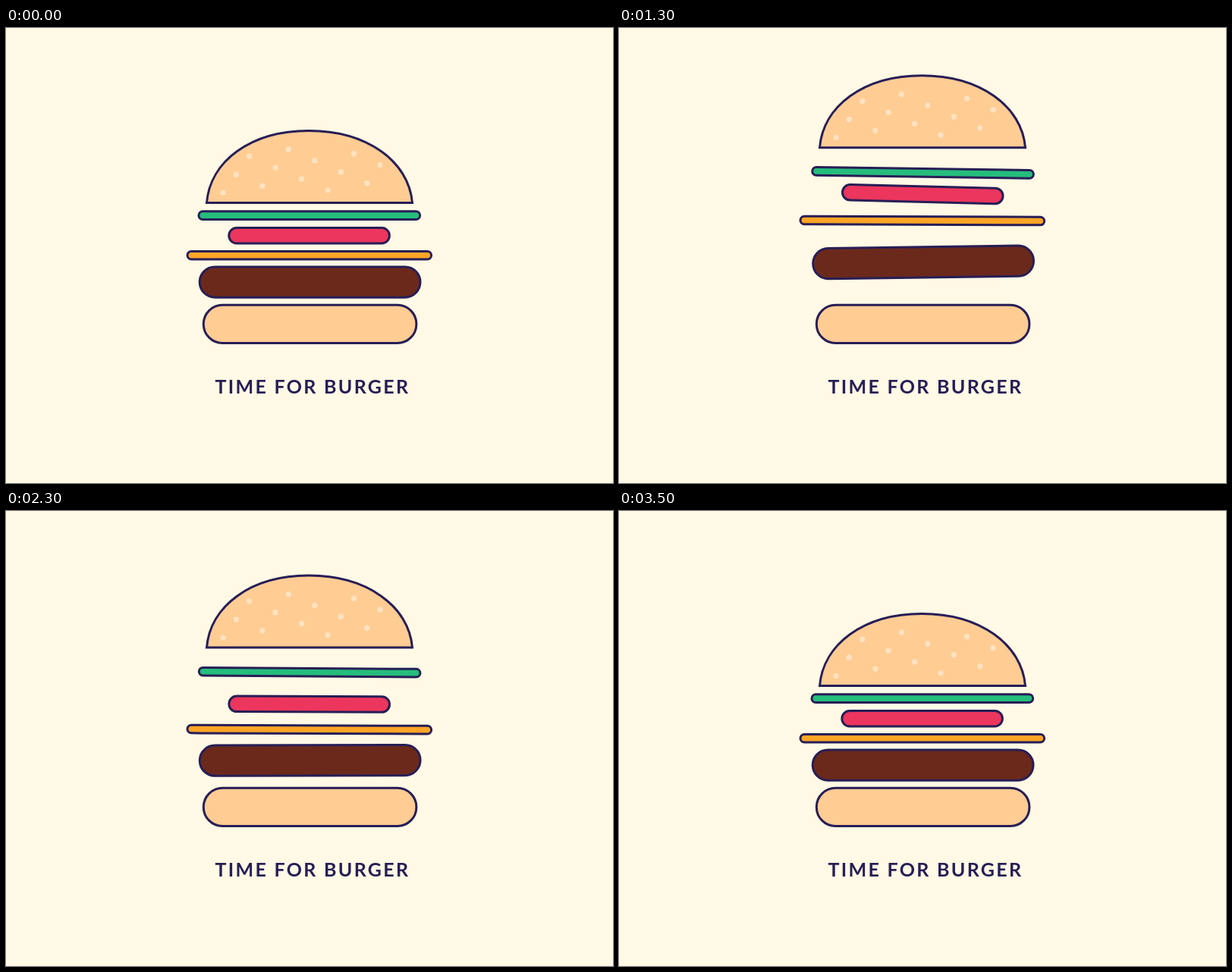
An HTML page for the animation above (4 s loop, 800 by 600 pixels).

```html
<!DOCTYPE html>
<html lang="en">
<head>
<meta charset="utf-8">
<title>Time for burger</title>
<style>
  html, body { margin: 0; width: 100%; height: 100%; overflow: hidden; background: #fff9e5; }
  svg { display: block; width: 800px; height: 600px; }
  .shape { stroke: #271e56; stroke-width: 3; }
  text { font: 700 25px Lato, "Open Sans", sans-serif; letter-spacing: 2.3px; fill: #271e56; }
</style>
</head>
<body>
<svg viewBox="0 0 800 600">
  <g class="shape">
    <rect x="260.3" y="365.3" width="280.6" height="50.2" rx="25.1" fill="#ffcc94"/>
    <rect id="patty" x="255.2" y="315" width="290.8" height="40.2" rx="20.1" fill="#6b291b"/>
    <rect id="cheese" x="239" y="294.4" width="321.6" height="10.6" rx="5.3" fill="#ffa526"/>
    <rect id="tomato" x="293.8" y="263.5" width="211.6" height="20.5" rx="10.2" fill="#ec365e"/>
    <rect id="lettuce" x="254" y="241.8" width="291.6" height="10.7" rx="5.3" fill="#25bd7c"/>
  </g>
  <g id="bun">
    <path class="shape" fill="#ffcc94" d="M264.5 230.5C269 176 322 135.5 399 135.5S531 176 535.5 230.5Z"/>
    <g id="seeds" fill="#ffe2c0"></g>
  </g>
  <text x="275.5" y="482">TIME FOR BURGER</text>
</svg>
<script>
const LOOP = 4000, STEP = 100, PEAK = 1500, BEAT = 500;
const $ = id => document.getElementById(id);

// Seeds: even columns, heights spread by the golden ratio
for (let i = 0; i < 13; i++) {
  const x = 286 + 17.25 * i, y = 155 + 63 * ((0.99 + 0.618 * i) % 1);
  $('seeds').innerHTML += `<circle cx="${x}" cy="${y}" r="3.7"/>`;
}

// height: lift in px at the peak; rise, fall: curve exponents;
// tilts: degrees on each beat up to the peak
const layers = {
  bun: { height: 84, end: 3500 },
  lettuce: { height: 65, end: 3200, tilts: [1, -1, 2] },
  tomato: { height: 69, rise: 1.63, fall: 0.8, tilts: [1, 2, 1] },
  cheese: { height: 58, rise: 1.67, tilts: [-1, -1, 1] },
  patty: { height: 31, rise: 1.18, tilts: [-0.5, -1, -0.65] }
};

function liftAt(t, { height, rise = 1, fall = 1, end = 2500 }) {
  return height * (t < PEAK
    ? (t / PEAK) ** rise
    : Math.max(0, (end - t) / (end - PEAK)) ** fall);
}

function tiltAt(t, [a, b, c]) {
  const beats = [0, a, b, c, c / 2, 0];
  const i = Math.floor(t / BEAT), from = beats[i] || 0, to = beats[i + 1] || 0;
  return from + (to - from) * (t / BEAT - i);
}

function draw(now) {
  const t = Math.floor(now % LOOP / STEP) * STEP;
  for (const [id, layer] of Object.entries(layers)) {
    const tilt = tiltAt(t, layer.tilts || [0, 0, 0]);
    $(id).setAttribute('transform', `translate(0 ${-liftAt(t, layer)}) rotate(${tilt} 400 300)`);
  }
}

const start = performance.now();
function tick() {
  draw(performance.now() - start);
  requestAnimationFrame(tick);
}
tick();
</script>
</body>
</html>
```
